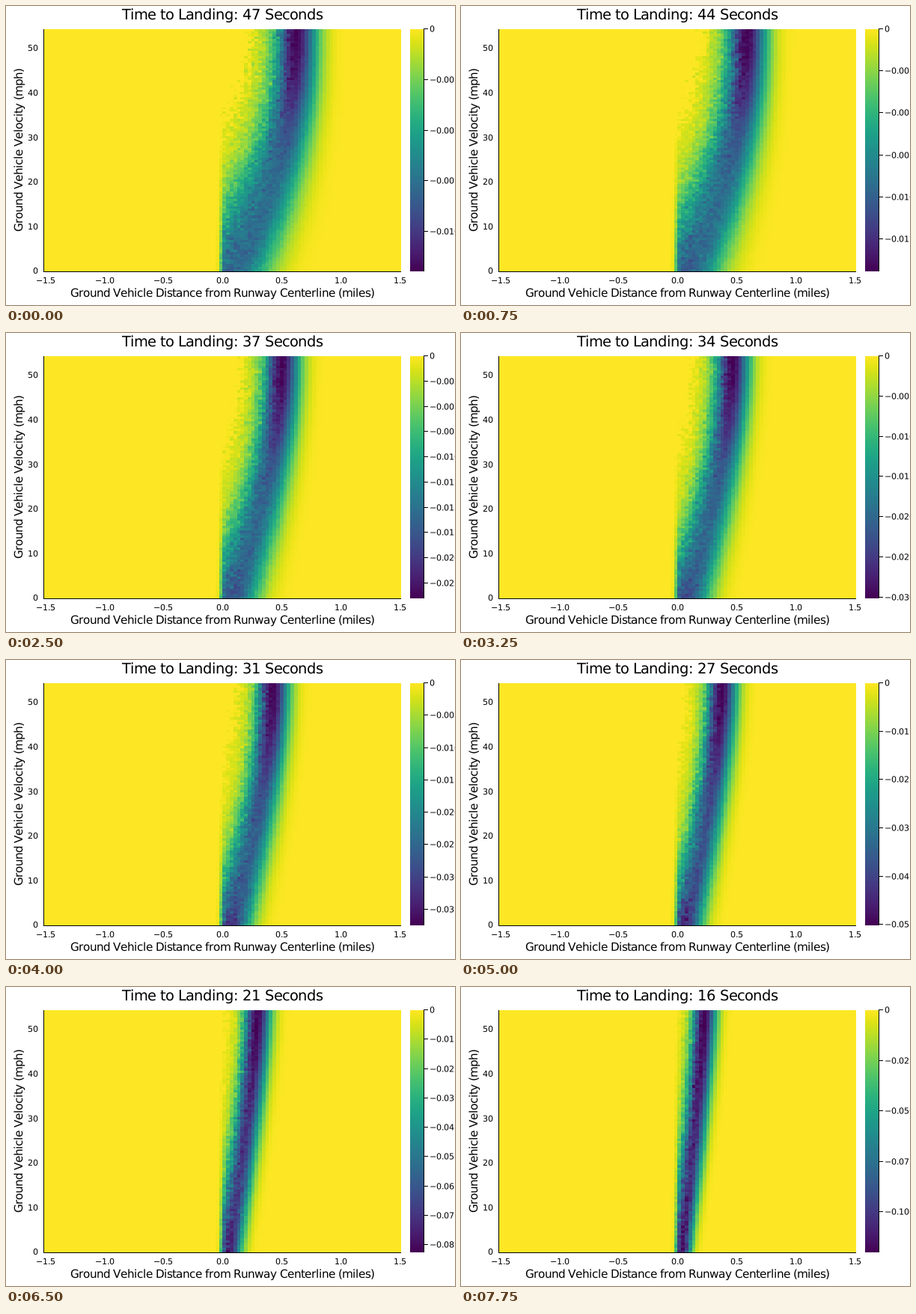
These frames come from a looping animation (600 px wide and 400 px high, 8 s). A matplotlib script:

```python
import math

import matplotlib.pyplot as plt
import numpy as np
from matplotlib.animation import FuncAnimation
from matplotlib.patches import PathPatch
from matplotlib.path import Path
from matplotlib.textpath import TextPath

W, H, DPI = 600, 400, 100
LEFT, RIGHT, TOP, BOTTOM = 50.5, 527.5, 31, 355
ZERO_X, PX_PER_MILE = 289.3, 157.6
PX_PER_MPH = 5.96
COLS, ROWS = 100, 100
BAR_LEFT, BAR_RIGHT = 540, 558
START, STEPS = 47, 32
MAX_TICKS = 10
TITLE_PT, LABEL_PT, TICK_PT = 14, 11, 8

plt.rcParams["font.family"] = "DejaVu Sans"
fig = plt.figure(figsize=(W / DPI, H / DPI), dpi=DPI, facecolor="white")
ax = fig.add_axes([0, 0, 1, 1])
ax.axis("off")

glyphs = {}


def glyph(char, px):
    """Outline of one character and its advance in whole pixels."""
    if (char, px) not in glyphs:
        bar = TextPath((0, 0), "|", size=px).get_extents().x0
        pair = TextPath((0, 0), char + "|", size=px)
        advance = pair.vertices[pair.vertices[:, 0] > 0][:, 0].max()
        bar_width = TextPath((0, 0), "|", size=px).get_extents().width
        advance = math.floor(advance - bar_width - bar)
        glyphs[char, px] = TextPath((0, 0), char, size=px), advance
    return glyphs[char, px]


def text_path(text, pt, x, y, align=0.5, upright=False):
    """Line of text on a whole-pixel grid; align 0 is left, 1 is right."""
    px = pt * DPI / 72
    verts, codes, pen = [], [], 0
    for char in text:
        shape, advance = glyph(char, px)
        if char != " ":
            verts.append(shape.vertices + [pen, 0])
            codes.append(shape.codes)
        pen += advance
    along, up = np.concatenate(verts).T
    along = along - round(pen * align)
    xy = (x - up, y - along) if upright else (x + along, y - up)
    return Path(np.column_stack(xy), np.concatenate(codes))


def label(*args, **kw):
    patch = PathPatch(text_path(*args, **kw), fc="black", lw=0, snap=False)
    return ax.add_patch(patch)


def line(xs, ys):
    return ax.plot(xs, ys, color="black", lw=0.72, solid_capstyle="butt",
                   snap=False)[0]


# Cell centres: columns in pixels, rows as speed from 0 (slow) to 1 (fast).
col = LEFT + (np.arange(COLS) + 0.5) * (RIGHT - LEFT) / COLS
speed = np.linspace(0, 1, ROWS)[:, None]
slow = 1 - speed


def peak_cost(t):
    """Largest penalty at t seconds, interpolated on a log scale."""
    times = [16, 21, 27, 34, 37, 41, 47]
    peaks = [0.120, 0.0825, 0.0501, 0.0301, 0.0240, 0.0174, 0.01195]
    return math.exp(np.interp(t, times, np.log(peaks)))


def field(t):
    """Relative penalty, 0 to 1, for each speed and distance."""
    reach = (0.0146 * t - 0.00003 * t * t) * PX_PER_MILE
    bend = 1.2 + 0.035 * (t - 16)
    centre = ZERO_X + reach * (0.16 + 0.84 * (1 - slow ** bend))

    right_top = 7 + 0.27 * t
    right_low = 8.5 * (t / 16) ** 1.25
    sig_right = right_top + (right_low - right_top) * slow ** 2
    sig_left = 7.5 + 0.22 * t + 47 * (t / START) ** 3.2 * slow ** 2

    times = [16, 21, 27, 34, 47]
    dip = np.interp(t, times, [0.12, 0.18, 0.26, 0.34, 0.36])
    bump = np.interp(t, times, [0.10, 0.14, 0.15, 0.10, 0.02])
    sag = np.interp(speed, [0, 0.19, 0.37, 0.56, 0.74, 0.9, 1],
                    [0.95, 1, 0.97, 0.75, 0.33, 0.06, 0])
    amp = 1 - dip * sag + bump * np.exp(-speed * 11)

    noise = np.random.default_rng(t).normal(size=(2, ROWS, COLS))
    d = col - centre
    z = d / np.where(d < 0, sig_left, sig_right)
    bell = np.exp(-z * z / 2)
    # Faint shelf behind the peak, ending in a ragged edge.
    shelf = 1 / (1 + np.exp(np.clip(-(z + 3.2 + 0.35 * noise[0]) / 0.15, -50, 50)))
    weight = 0.09 * t / START
    shape = (1 - weight) * bell + weight * np.where(d < 0, shelf, bell)
    edge = 1 / (1 + np.exp(-(col - 287.4) / 1.7))

    grain = 0.012 + 0.04 * slow + 0.2 * np.clip(-z / 2.5, 0, 1)
    return np.clip(amp * shape * edge * (1 + grain * noise[1]), 0, 1)


def tick_step(peak):
    """Smallest round step that keeps the colour bar within MAX_TICKS."""
    for exp in range(-4, 0):
        for base in (1, 2.5, 5):
            step = base * 10.0 ** exp
            if int(peak / step) < MAX_TICKS:
                return step, -exp + (base == 2.5)
    return 0.1, 1


def image(data, left, right, origin):
    return ax.imshow(data, cmap="viridis", vmin=-1, vmax=0, origin=origin,
                     extent=(left, right, BOTTOM, TOP),
                     interpolation="nearest", aspect="auto")


heat = image(np.zeros((ROWS, COLS)), LEFT, RIGHT, "lower")
image(np.linspace(0, -1, 256)[:, None], BAR_LEFT, BAR_RIGHT, "upper")
ax.set_xlim(0, W)
ax.set_ylim(H, 0)

line([50.5, 50.5], [TOP, BOTTOM + 1])
line([50, 528], [355.5, 355.5])
line([558.5, 558.5], [TOP - 1, BOTTOM])

for i in range(-3, 4):
    text = f"{i / 2:.1f}".replace("-", "\u2212")
    label(text, TICK_PT, round(ZERO_X + i / 2 * PX_PER_MILE), 371)
for mph in range(0, 60, 10):
    label(str(mph), TICK_PT, 43, round(358.5 - mph * PX_PER_MPH), align=1)

label("Ground Vehicle Distance from Runway Centerline (miles)", LABEL_PT, 289, 389)
label("Ground Vehicle Velocity (mph)", LABEL_PT, 22, 193, upright=True)
title = label("0", TITLE_PT, 289, 18)

bar_ticks = line([], [])
bar_labels = [label("0", TICK_PT, 566, 35, align=0) for _ in range(MAX_TICKS)]


def draw(i):
    t = START - i
    title.set_path(text_path(f"Time to Landing: {t} Seconds", TITLE_PT, 289, 18))
    heat.set_data(-field(t))

    peak = peak_cost(t)
    step, places = tick_step(peak)
    xs, ys = [], []
    for k, patch in enumerate(bar_labels):
        value = k * step
        patch.set_visible(value <= peak)
        if value > peak:
            continue
        y = math.floor(TOP + value / peak * (BOTTOM - TOP) - 0.5)
        text = f"\u2212{value:.{places}f}" if k else "0"
        patch.set_path(text_path(text, TICK_PT, 566, y + 4.5, align=0))
        xs += [558, 564, np.nan]
        ys += [y + 0.5, y + 0.5, np.nan]
    bar_ticks.set_data(xs, ys)
    return [heat, title, bar_ticks, *bar_labels]


anim = FuncAnimation(fig, draw, frames=STEPS, interval=250, repeat=True,
                     repeat_delay=0, blit=False)
plt.show()
```
